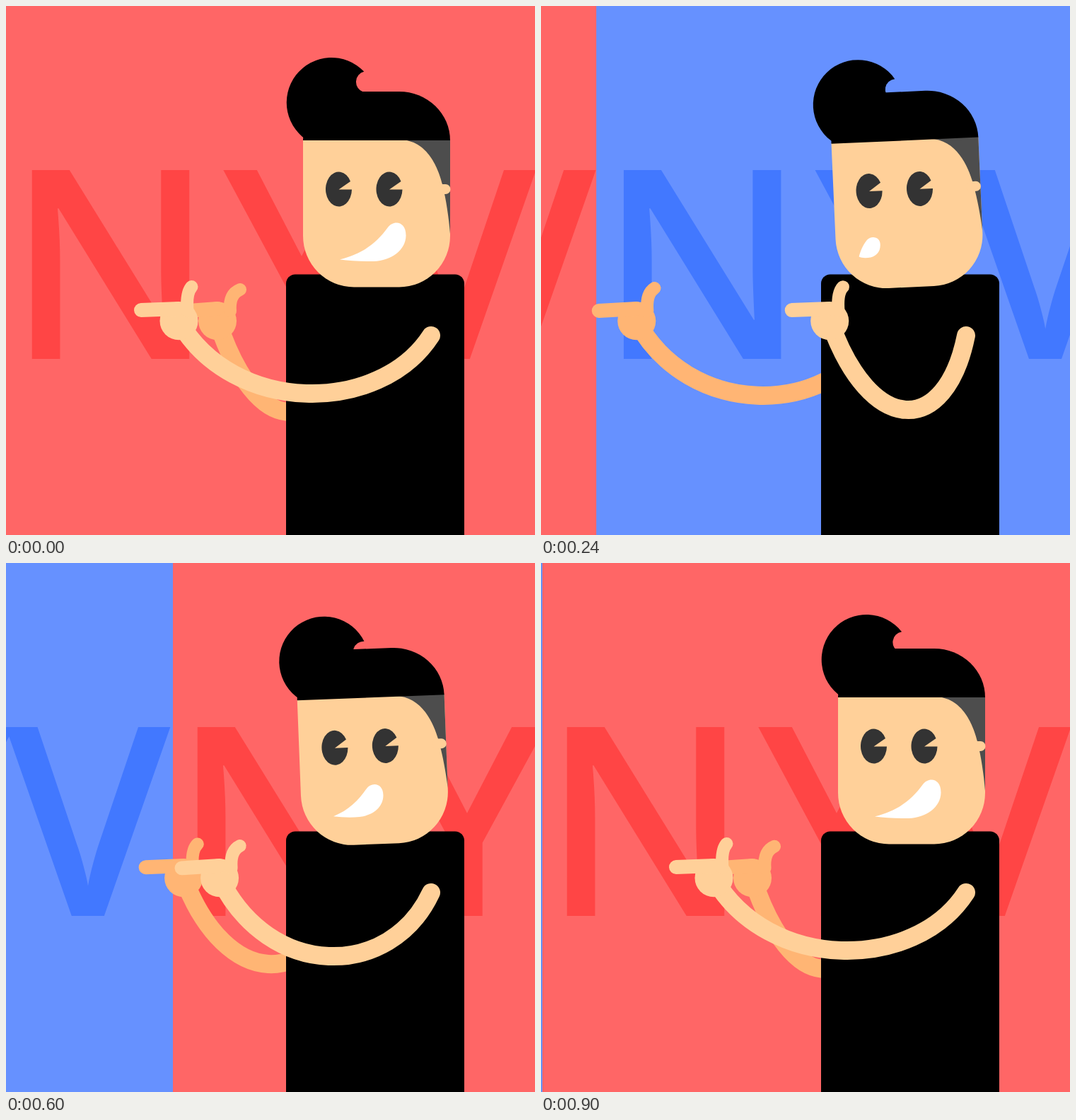
Animation of 748 by 748 pixels, one loop 930 ms. Source, as an HTML page:

```html
<!DOCTYPE html>
<html lang="en">
<head>
<meta charset="utf-8">
<title>Pointing man</title>
<style>
  html, body { margin: 0; width: 100%; height: 100%; overflow: hidden; background: #ff6666; }
  svg { display: block; width: 100vw; height: 100vh; }
  text { font: 600 374px "Open Sans", "Noto Sans", sans-serif; text-anchor: middle; }
  .front { --skin: #ffd099; }
  .back { --skin: #ffb574; }
  .arm circle { fill: var(--skin); }
  .arm path { fill: none; stroke: var(--skin); stroke-linecap: round; }
</style>
</head>
<body>
<svg viewBox="0 0 748 748">
  <g id="panels">
    <g id="red">
      <rect width="1600" height="748" fill="#ff6666"/>
      <text x="146 416 631" y="499" fill="#ff4545">NYV</text>
    </g>
    <g id="blue">
      <rect width="1600" height="748" fill="#6691ff"/>
      <text x="150 420 635" y="499" fill="#4278ff">NYV</text>
    </g>
  </g>

  <g id="backArm" class="arm back"></g>
  <rect x="396" y="379.5" width="252" height="400" rx="13"/>

  <g id="head">
    <path id="quiff" d="M506.3 92.8A63.5 63.5 0 1 0 520 158L505 121.5A15 15 0 0 1 506.3 92.8Z"/>
    <path fill="#ffd099" d="M420 189V325A72 72.5 0 0 0 492 397.5H556A72 72.5 0 0 0 628 325V189Z"/>
    <path fill="#4d4d4d" d="M556 189C597 189 612 232 617 252C622 272 626 298 628 322V189Z"/>
    <rect x="608" y="252" width="20.5" height="14" rx="7" fill="#ffd099"/>
    <path d="M420 190A72 69 0 0 1 492 121H556A72 69 0 0 1 628 190Z"/>
    <g fill="#333">
      <path id="eye" d="M470.5 259.5l16.5 -11.5A18.5 24.5 0 1 0 489 259.5Z"/>
      <use href="#eye" x="71.5"/>
    </g>
    <path id="mouth" fill="#fff"/>
  </g>

  <g id="frontArm" class="arm front"></g>
</svg>

<script>
const STEP = 30, LOOP = 930, HALF = 15;
const $ = id => document.getElementById(id);
const mix = (a, b, k) => a + (b - a) * k;

// Cubic bezier (x1, 0, 0, 1): short ease in, long ease out
function ease(p, x1) {
  if (p <= 0) return 0;
  if (p >= 1) return 1;
  let lo = 0, hi = 1;
  for (let i = 0; i < 30; i++) {
    const s = (lo + hi) / 2;
    const x = 3 * (1 - s) ** 2 * s * x1 + s ** 3;
    if (x < p) lo = s; else hi = s;
  }
  return lo * lo * (3 - 2 * lo);
}

// Smooth curve through [time, value] pairs
function curve(keys, t) {
  const last = keys.length - 1;
  let i = 0;
  while (i < last - 1 && t > keys[i + 1][0]) i++;
  const slope = j => j <= 0 || j >= last ? 0 :
    (keys[j + 1][1] - keys[j - 1][1]) / (keys[j + 1][0] - keys[j - 1][0]);
  const [t0, a] = keys[i], [t1, b] = keys[i + 1];
  const d = t1 - t0, k = (t - t0) / d;
  const w = k * k * (3 - 2 * k);
  return mix(a, b, w) + d * k * (1 - k) * ((1 - k) * slope(i) - k * slope(i + 1));
}

const TILT = [[0, 0], [2, 3.6], [5, -2.2], [6, -3.2], [7, -3.05], [11, -.93], [15, 0]];
const CURL = [[0, 0], [5, 14.6], [11, 6.5], [17, 15], [22, 19], [26, 4.5], [30, 5.3], [31, 0]];
const FRONT_THUMB = [[0, 0], [5, 0], [11, .2], [17, 1], [22, .5], [26, .1], [30, 0]];
const BACK_THUMB = [[0, 1], [5, .93], [11, .1], [17, 0], [22, .25], [26, .6], [30, .93], [31, 1]];

// Start point, then four cubic segments
const SMILE = [472, 358.5, 505, 350, 524, 335, 540, 313, 548, 302, 566, 304, 565.5, 325,
  565, 345, 545, 360, 520, 361, 503, 361.5, 487, 360, 472, 358.5];
const POUT = [449.5, 350.5, 448, 343, 449.5, 336, 455, 330, 461, 324, 474, 327, 472.5, 338,
  472, 345, 469, 350, 462, 352, 457, 353, 451.5, 352.5, 449.5, 350.5];

function mouthPath(k) {
  const p = SMILE.map((v, i) => mix(v, POUT[i], k).toFixed(2));
  return `M${p.slice(0, 2)}C${p.slice(2)}Z`;
}

function makeArm(id) {
  const g = $(id);
  const add = (tag, attrs) => {
    const el = document.createElementNS("http://www.w3.org/2000/svg", tag);
    for (const k in attrs) el.setAttribute(k, attrs[k]);
    return g.appendChild(el);
  };
  const limb = add("path", { "stroke-width": 26 });
  const palm = add("circle", { r: 27, cy: 445.3 });
  const finger = add("path", { "stroke-width": 20 });
  const thumb = add("path", { "stroke-width": 18 });

  // bend: 0 stretched, 1 pulled in; lean: thumb tilted back
  return (bend, lean, dx) => {
    const x = mix(244.5, 428.5, bend), y = 445.5;
    const low = 578.5 + 34.5 * bend;
    g.setAttribute("transform", `translate(${dx} 0)`);
    palm.setAttribute("cx", x);
    limb.setAttribute("d",
      `M${x} 446C${321 + 163 * bend} ${low} ${528 + 49.5 * bend} ${low} 601 466`);
    finger.setAttribute("d", `M${x - 53.5} ${y - 15.5 + 1.8 * lean}L${x} ${y - 17.5}`);
    thumb.setAttribute("d", `M${x + mix(12, 18, lean)} ${y - 14}` +
      `Q${x + mix(10, 16, lean)} ${y - mix(40, 38, lean)} ` +
      `${x + mix(18, 32, lean)} ${y - mix(48.5, 44.5, lean)}`);
  };
}

const frontArm = makeArm("frontArm"), backArm = makeArm("backArm");
const place = (id, x) => $(id).setAttribute("transform", `translate(${x} 0)`);
let topPanel = "blue";

function draw(ms) {
  const f = Math.floor((ms % LOOP) / STEP);
  const returning = f >= HALF;
  const local = returning ? f - HALF : f;
  const p = local / HALF;
  const y = ease(p, .33);
  const bend = returning ? 1 - y : y;
  const reach = returning ? 1 - ease(p, .17) : y;

  const wanted = returning ? "red" : "blue";
  if (wanted !== topPanel) {
    $("panels").appendChild($(wanted));
    topPanel = wanted;
  }
  place("red", returning ? 2 + 748 * (1 - y) : 2 - 755 * y);
  place("blue", returning ? -5 - 748 * y : -5 + 755 * (1 - y));

  $("head").setAttribute("transform", `rotate(${curve(TILT, local)} 524 406)`);
  $("quiff").setAttribute("transform", `rotate(${curve(CURL, f)} 460 136)`);
  $("mouth").setAttribute("d", mouthPath(bend));

  frontArm(bend, curve(FRONT_THUMB, f), 0);
  backArm(1 - reach, curve(BACK_THUMB, f), -129.5);
}

const start = performance.now();
function tick() {
  draw(performance.now() - start);
  requestAnimationFrame(tick);
}
tick();
</script>
</body>
</html>
```
